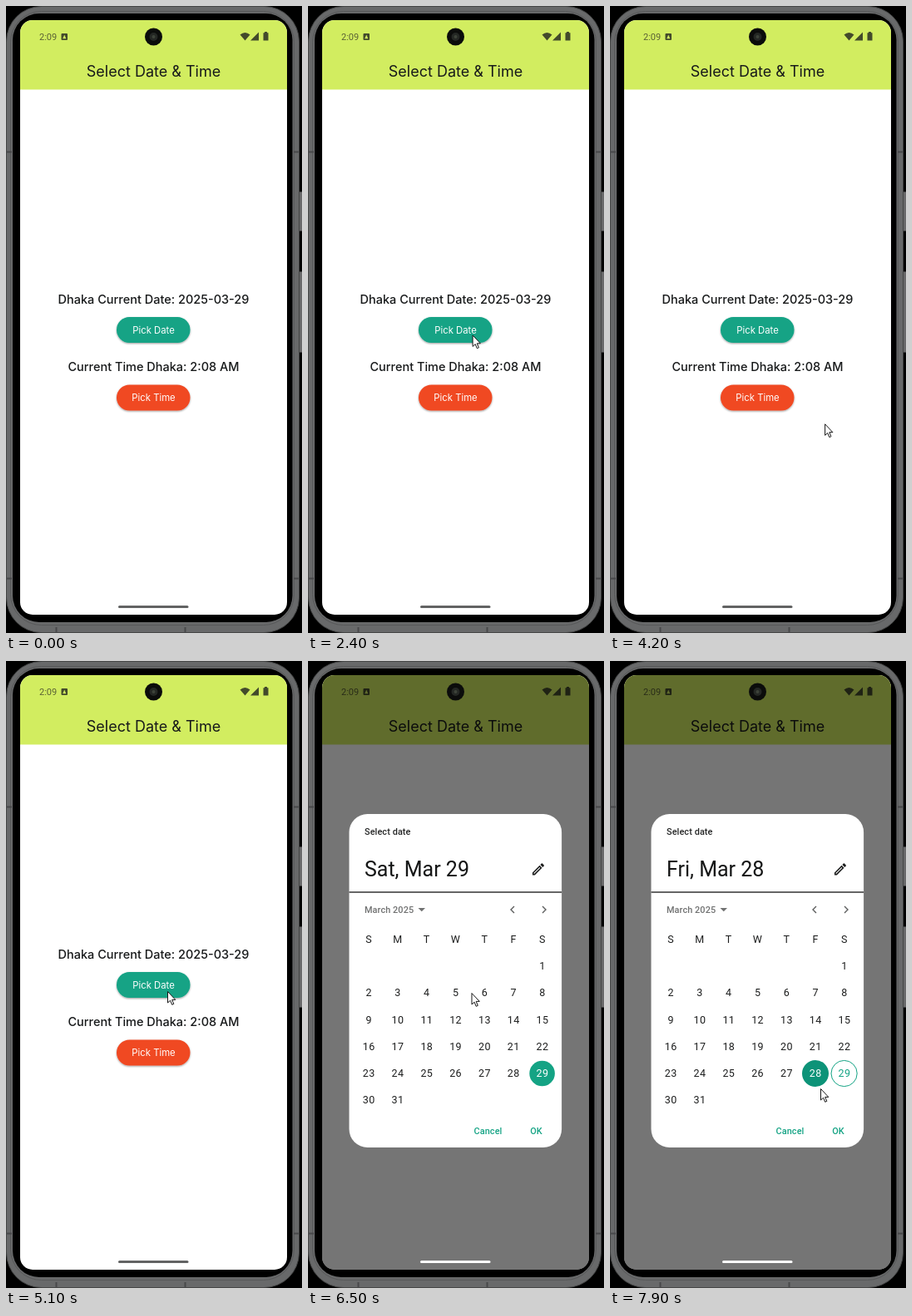
Recreate the animation shown at these times as an HTML page. Size 356 px wide and 754 px high, loop 8 s.

```html
<!DOCTYPE html>
<html lang="en">
<head>
<meta charset="utf-8">
<title>Date and time picker</title>
<style>
  html, body { margin: 0; width: 100%; height: 100%; overflow: hidden; background: #000; }
  svg { display: block; width: 356px; height: 754px; }
  text { font-family: Roboto, sans-serif; }
  .app text { font-family: Inter, sans-serif; text-anchor: middle; fill: #17191a; }
  .app .label { font-size: 14.5px; font-weight: 500; }
  .app .button { font-size: 11.3px; fill: #fff; }
  .small { font-size: 10.9px; font-weight: 500; letter-spacing: .08px; }
  .day { font-size: 12.5px; letter-spacing: .39px; text-anchor: middle; fill: #1c1d1d; }
  .action { text-anchor: middle; fill: #14a384; }
</style>
</head>
<body>
<svg viewBox="0 0 356 754">
  <defs>
    <clipPath id="screen"><rect x="17" y="17" width="321" height="715" rx="15"/></clipPath>
    <filter id="shadow" x="-10%" y="-20%" width="120%" height="150%">
      <feDropShadow dx="0" dy="1" stdDeviation=".8" flood-opacity=".4"/>
    </filter>
  </defs>

  <!-- phone body -->
  <g fill="#69696a" stroke="#3a3a3b">
    <rect x="349.5" y="223.5" width="8" height="47"/>
    <rect x="349.5" y="319.5" width="8" height="97"/>
  </g>
  <rect x=".5" y=".5" width="352" height="753" rx="42" fill="#68696a" stroke="#454646"/>
  <rect x="5.500" y="6.500" width="341" height="738" rx="37" fill="none" stroke="#58595a"/>
  <path d="M0 175.500H7M346 175.500H353M0 688.500H7M346 688.500H353M60.500 747V754M215.500 747V754" stroke="#48494a" stroke-width="2"/>
  <rect x="8" y="9" width="336.500" height="732" rx="32" fill="#000"/>

  <g clip-path="url(#screen)">
    <g class="app">
      <rect x="17" y="17" width="321" height="715" fill="#fff"/>
      <rect x="17" y="17" width="321" height="83.500" fill="#d2ed60"/>
      <text x="177.500" y="85" font-size="18">Select Date &amp; Time</text>
      <text class="label" x="177.500" y="357.500">Dhaka Current Date: 2025-03-29</text>
      <text class="label" x="177.500" y="439">Current Time Dhaka: 2:08 AM</text>
      <g filter="url(#shadow)">
        <rect x="133" y="374" width="88.500" height="31" rx="15.500" fill="#12a385"/>
        <rect x="133" y="455.500" width="88.500" height="31" rx="15.500" fill="#f04824"/>
      </g>
      <text class="button" x="177.500" y="393.500">Pick Date</text>
      <text class="button" x="177.500" y="475">Pick Time</text>
    </g>

    <g fill="#434a2b">
      <text x="40" y="41" font-size="11" fill="#596034">2:09</text>
      <rect x="66.500" y="33" width="7.500" height="8" rx="1"/>
      <path d="M70.250 34.500L72.300 39.300H68.200Z" fill="#d2ed60"/>
      <path d="M281.500 34.500Q287.500 29.500 293.500 34.500L287.500 41.500Z"/>
      <path d="M304 31.500V41.500H294Z"/>
      <path d="M311 31H314V32.200H315.500V41.500H309.500V32.200H311Z"/>
    </g>

    <rect id="dim" x="17" y="17" width="321" height="715" fill-opacity=".54"/>
    <rect id="home" x="135" y="721" width="84.500" height="3" rx="1.500"/>
  </g>

  <circle cx="177.500" cy="37" r="10.500" fill="#0b0c0b"/>
  <circle cx="177.500" cy="37" r="5" fill="#242724"/>
  <circle cx="177.500" cy="37" r="2" fill="#3d433a"/>

  <g id="dialog">
    <rect x="49.500" y="184" width="255.600" height="401" rx="22" fill="#fff"/>
    <text class="small" x="68" y="209" fill="#262727">Select date</text>
    <text id="headline" x="68" y="259" font-size="25" fill="#151616"></text>
    <path transform="translate(267.6 241) scale(.78)" fill="#1c1d1d" fill-rule="evenodd"
      d="M3 17.250V21H6.750L17.810 9.940L14.060 6.190ZM14.060 9.020L14.980 9.940L5.920 19H5V18.080ZM15.130 5.120L16.960 3.290Q17.660 2.700 18.370 3.290L20.710 5.630Q21.300 6.330 20.710 7.040L18.880 8.870Z"/>
    <path d="M49.500 278H305" stroke="#333" stroke-width="1.300"/>
    <text class="small" x="68" y="302.700" fill="#707171">March 2025</text>
    <path d="M132.500 297H141L136.750 301.300Z" fill="#707171"/>
    <path d="M248 295L244 299L248 303M282 295L286 299L282 303" fill="none" stroke="#5d5e5e" stroke-width="1.400"/>
    <circle id="d28" cx="247" cy="496" r="16" fill="#0d9378"/>
    <circle id="d29" cx="281.600" cy="496" fill="#14a384"/>
    <circle id="ring" cx="281.600" cy="496" r="15.600" fill="#fff" stroke="#14a384"/>
    <g id="grid"></g>
    <text class="small action" x="216.500" y="569">Cancel</text>
    <text class="small action" x="274.500" y="569">OK</text>
  </g>

  <path id="cursor" d="M.5 .5V14L3.600 11.200L5.700 16.300L7.800 15.400L5.700 10.400H9.800Z" fill="#fff" stroke="#161616"/>
</svg>

<script>
const LOOP = 8000, STEP = 100;
const OPEN = 5700, SELECT = 7600;

// Pointer stops: time, x, y
const stops = [
  [800, 17, 249], [1300, 227, 405], [1900, 227, 405], [2700, 184, 391],
  [2800, 184, 391], [3200, 164, 457], [3500, 168, 476], [3700, 168, 476],
  [3800, 261, 507], [4100, 261, 507], [4900, 194, 397], [5600, 194, 397],
  [5700, 194, 394], [6400, 194, 394], [7100, 239, 484], [7200, 239, 484],
  [7900, 253, 514]
];

const el = id => document.getElementById(id);
const show = (id, on) => el(id).setAttribute('visibility', on ? 'inherit' : 'hidden');

const cell = (label, col, row) =>
  `<text class="day" id="t${label}" x="${73.2 + col * 34.8}" y="${339.2 + row * 32.13}">${label}</text>`;

let cells = [...'SMTWTFS'].map((name, col) => cell(name, col, 0)).join('');
for (let day = 1; day <= 31; day++) {
  const slot = day + 5;
  cells += cell(day, slot % 7, 1 + Math.floor(slot / 7));
}
el('grid').innerHTML = cells;
el('d29').setAttribute('r', 15.3);

function pointer(t) {
  const i = stops.findIndex(s => s[0] >= t);
  if (i < 1) return stops.at(i).slice(1);
  const [t0, x0, y0] = stops[i - 1], [t1, x1, y1] = stops[i];
  const p = (t - t0) / (t1 - t0), e = p * p * (3 - 2 * p);
  return [x0 + (x1 - x0) * e, y0 + (y1 - y0) * e];
}

function draw(now) {
  const t = Math.floor(now % LOOP / STEP) * STEP;
  const open = t >= OPEN, picked = t >= SELECT;

  show('dim', open);
  show('dialog', open);
  el('home').setAttribute('fill', !open ? '#626363' : t < 5800 ? '#2e2e2e' : t < 5900 ? '#a5a5a5' : '#fff');

  el('headline').textContent = picked ? 'Fri, Mar 28' : 'Sat, Mar 29';
  show('d28', picked);
  show('d29', !picked);
  show('ring', picked);
  el('t28').style.fill = picked ? '#fff' : '';
  el('t29').style.fill = picked ? '#14a384' : '#fff';

  show('cursor', t >= stops[0][0]);
  el('cursor').setAttribute('transform', `translate(${pointer(t)})`);
}

let start;
function tick(now) {
  start ??= now;
  draw(now - start);
  requestAnimationFrame(tick);
}
draw(0);
requestAnimationFrame(tick);
</script>
</body>
</html>
```
